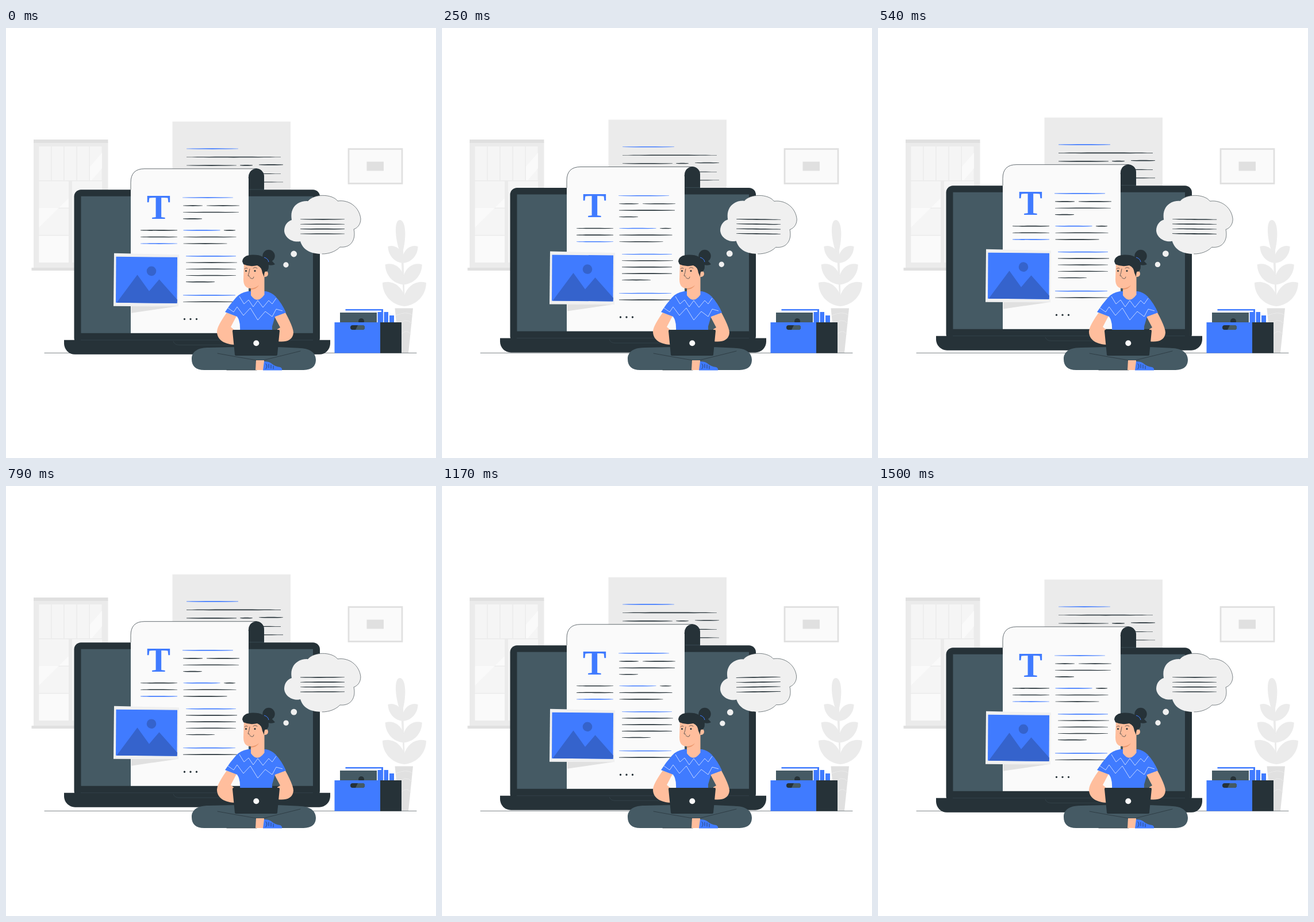
An HTML page for the animation above (1.54 s loop, 748 by 748 pixels).

```html
<!DOCTYPE html>
<html lang="en">
<head>
<meta charset="utf-8">
<title>Writing illustration</title>
<style>
  html, body { margin: 0; width: 100%; height: 100%; overflow: hidden; background: #fff; }
  svg { display: block; width: 100%; height: 100%; }
  .dark { fill: #263238; }
  .slate { fill: #455a64; }
  .blue { fill: #407bff; }
  .navy { fill: #3563cc; }
  .skin { fill: #ffbe9d; }
  .pale { fill: #ebebeb; }
  .grey { fill: #e0e0e0; }
  .paper { fill: #fafafa; }
  .cloud { fill: #f0f0f0; }
  .ink { fill: none; stroke: #263238; stroke-width: .7; stroke-linecap: round; stroke-linejoin: round; }
</style>
</head>
<body>
<svg viewBox="0 0 748 748">
  <!-- window -->
  <path class="pale" d="M48 199H177.500V418H48Z"/>
  <path class="grey" d="M48 194H177.500V200H48ZM44.500 417H180V422H44.500Z"/>
  <g id="panes"></g>
  <path class="paper" d="M57.500 347L109 296V312.500H57.500ZM57.500 361.500H109V408H57.500ZM146 241L167 217V244L149 265H146Z"/>

  <!-- wall frame -->
  <rect x="596" y="210.500" width="93" height="60" fill="#fafafa" stroke="#e0e0e0" stroke-width="2.800"/>
  <path class="grey" d="M627.500 232.500H657V248.500H627.500Z"/>

  <!-- plant -->
  <path class="pale" d="M685 334C695 334 697 361 691 386L694 484H692L687 394C677 371 674 334 685 334Z"/>
  <g id="leaves" class="pale"></g>
  <path class="grey" d="M676.500 487.500H708L700 565H684Z"/>
  <path d="M678 500Q696 492 707 499M680 518Q695 502 706 514M682 540Q695 520 704 533" fill="none" stroke="#ebebeb"/>
  <path class="ink" d="M67 565.300H714" style="stroke-width:.6"/>

  <!-- file box -->
  <path class="blue" d="M590.500 489H656V514H590.500ZM657.500 494H665V514H657.500ZM667 500H675V514H667Z"/>
  <path fill="#fff" d="M590 491.500H653V514H579V493H590Z"/>
  <path class="slate" d="M581 495H645V513H581Z"/>
  <path class="blue" d="M646.500 494H655V513H646.500Z"/>
  <circle class="dark" cx="618" cy="510" r="5"/>
  <path class="blue" d="M571.500 512H651V565.500H571.500Z"/>
  <path class="dark" d="M651 512H688V565.500H651Z"/>
  <rect class="dark" x="599" y="517" width="25" height="8" rx="4"/>
  <path class="slate" d="M612 517H620A4 4 0 0 1 620 525H608Z"/>

  <g id="laptop">
    <path class="pale" d="M289.500 163H495V300H289.500Z"/>
    <g id="backText"></g>
    <rect class="dark" x="118.500" y="281.500" width="427.500" height="270" rx="12"/>
    <path class="slate" d="M130.500 293H534V531H130.500Z"/>
    <path class="dark" d="M101 543H564V549A19 19 0 0 1 545 568H120A19 19 0 0 1 101 549Z"/>
    <path d="M130 543H534M291 545Q293 551.500 301 551.500H400" fill="none" stroke="#37474f" stroke-width=".7"/>
    <path class="dark" d="M421 292V258A14 13.500 0 0 1 449 258V281.500L440 292Z"/>
    <path d="M423 281H449" stroke="#455a64" stroke-width=".6"/>
    <path class="paper" d="M217 531V269Q217 245 241 245H436Q422 246 422 261V531Z"/>
    <path class="ink" d="M217 281V269Q217 245 241 245H436Q422 246 422 261"/>
    <text class="blue" x="265.500" y="332.500" text-anchor="middle" font-family="'Liberation Serif', serif" font-weight="700" font-size="62">T</text>
    <g id="pageText"></g>
    <path d="M310.500 506.500H333" fill="none" stroke="#263238" stroke-width="3.400" stroke-linecap="round" stroke-dasharray="0 10.500"/>
    <path class="grey" d="M218 484H300L218 496Z"/>
    <path class="cloud" d="M188 392L301 394.500L300 484.500L187 484Z"/>
    <path class="blue" d="M191.500 398L298 399L297.500 479L191 478Z"/>
    <path class="navy" d="M192.500 478L228.500 429.500L249 458L266.500 437.500L298 473L297.500 479Z"/>
    <circle class="navy" cx="253" cy="423" r="8.300"/>
  </g>

  <g id="thought">
    <path class="cloud" d="M497 334C493 312 508 300 525 301C535 288 567 288 577 301C597 298 615 312 617 332C617 342 611 348 605 350C609 367 601 383 581 381C573 389 562 393 550 393C531 393 517 387 512 371C500 374 485 366 484 353C484 343 490 336 497 334Z"/>
    <path class="ink" style="stroke-width:.6" d="M525 301C535 288 567 288 577 301C597 298 615 312 617 332C617 342 611 348 605 350C609 367 601 383 581 381C573 389 562 393 550 393"/>
    <g id="thoughtText"></g>
    <circle class="cloud" cx="500.700" cy="393" r="5.400"/>
    <circle class="cloud" cx="487" cy="412" r="4.700"/>
  </g>

  <!-- woman -->
  <path class="slate" d="M323 576C323 561 336 556 353 556L398 555H472L513 557C530 558 539 566 539 577C539 590 530 595 515 595H345C330 595 323 588 323 576Z"/>
  <path class="ink" d="M368 566Q400 572 436 578H447Q480 570 512 562M384 595H436"/>
  <path class="skin" d="M435 578H449V595H434Z"/>
  <path class="blue" d="M449 580Q457 580 461 583Q468 589 477 590Q481 592 480 595.500H447Z"/>
  <path class="ink" d="M452 584Q456 588 452 593M457 585V591M461 586V592M465 588V593"/>
  <path class="skin" d="M384 495Q367 519 367 528C367 544 382 550 398 551V526L391 520L401 501ZM467 502L486 495Q500 521 500 530C499 544 486 547 472 545V524L477 521Z"/>
  <path class="blue" d="M421 458Q406 461 400 469Q390 480 381 494L402 502Q408 510 407 527H463V519L468 502L487 495Q480 479 469 467Q462 460 452 458Z"/>
  <path d="M406 467L414 480L422 473L430 485L438 474L447 486L457 474L463 480L470 470M386 487L396 494L402 485L413 500L425 487L438 508L451 493L463 502L470 489L481 492" fill="none" stroke="#fff" stroke-width=".7"/>
  <path class="skin" d="M414 407L413 437Q413 453 426 453V465Q437 481 449.500 464V433Q456 433 456 427Q455 421 449 423L445 407Z"/>
  <path fill="#eb996e" d="M426 453Q436 452 440 447Q437 454 426 455Z"/>
  <circle class="dark" cx="457" cy="396.500" r="10.700"/>
  <path class="dark" d="M455 397L468 411Q463 414 456 412Z"/>
  <path class="dark" d="M411 406Q412 395 429 394.500Q450 394 456 408Q459 419 453 424Q449 421 449 433L446 426Q445 416 437 413Q424 416 413 411Z"/>
  <path d="M449 399Q456 401 457 407" fill="none" stroke="#407bff"/>
  <path class="ink" d="M415 419Q417 416 420 418M430 418Q433 415 437 418M424 419Q423 426 421 431L424 432M424 434Q430 439 431 433"/>
  <circle class="dark" cx="417.500" cy="422.500" r="1.500"/>
  <circle class="dark" cx="433" cy="422.500" r="1.500"/>
  <path class="dark" d="M395.500 525H474.500Q476 525 476 527L472 568Q472 570 470 570H400Q398 570 398 568L394 527Q394 525 395.500 525Z"/>
  <circle class="paper" cx="435.300" cy="548.300" r="5"/>
</svg>
<script>
const byId = id => document.getElementById(id);

function addPath(id, d, attributes) {
  byId(id).insertAdjacentHTML('beforeend', `<path d="${d}" ${attributes}/>`);
}

// A ruled line that tapers at both ends like a brush stroke
function brush(id, x, y, width, color = 'dark') {
  const bend = width * .3, flat = width * .4;
  addPath(id, `M${x} ${y - .3}c${bend} -.7 ${bend + flat} -.7 ${width} 0v.6` +
    `c${-bend} .7 ${-bend - flat} .7 ${-width} 0Z`, `class="${color}"`);
}

function paragraph(id, x, y, pitch, widths, blueRow) {
  widths.forEach((width, row) =>
    brush(id, x, y + row * pitch, width, row === blueRow ? 'blue' : 'dark'));
}

const ROW = 11.4;
paragraph('backText', 314, 210.2, 14.5, [90, 164, 87, 164, 168], 0);
brush('backText', 407, 239, 22);
brush('backText', 440, 238, 42);

brush('pageText', 307, 295.2, 88, 'blue');
paragraph('pageText', 308, 309.2, ROW, [34, 97, 33]);
brush('pageText', 349, 309.2, 57);
paragraph('pageText', 234, 352, ROW + .2, [64, 64, 64], 2);
paragraph('pageText', 308.5, 352, ROW + .2, [64, 92, 76], 0);
brush('pageText', 379, 352, 20);
paragraph('pageText', 313, 397, ROW - .2, [87, 89, 87, 87, 50], 0);
paragraph('pageText', 308, 465, ROW, [91, 94], 0);
paragraph('thoughtText', 512, 332.8, 8.4, [77, 77, 77, 77]);

for (let i = 0; i < 5; i++) addPath('panes', `M${57.5 + i * 22.1} 206h20.6v59h-20.6Z`, 'fill="#f5f5f5"');
for (let i = 0; i < 3; i++) addPath('panes', `M57.5 ${266.5 + i * 47.5}h51.5v46h-51.5Z`, 'fill="#f5f5f5"');
addPath('panes', 'M115 266.5H167V408H115Z', 'fill="#f5f5f5"');

// Pairs of leaves, wider towards the pot
for (let level = 0; level < 3; level++) {
  for (const side of [-1, 1]) {
    const size = 26 + level * 6;
    addPath('leaves', 'M0 0C.6 -.05 1 -.5 1 -1C.6 -1.12 .15 -.9 0 -.45Z',
      `transform="translate(${690.5 + level * 1.2} ${409 + level * 37.5}) scale(${side * size} ${size + 3})"`);
  }
}

const LOOP = 1540, CYCLE = 1500, LEAD = 10, LIFT = 10, SWAY = 1;
const laptop = byId('laptop'), thought = byId('thought');

// Linear swing 0 → 1 → 0 over one turn
const triangle = turn => 1 - Math.abs(1 - 2 * (turn - Math.floor(turn)));

function render() {
  const turn = (performance.now() % LOOP + LEAD) / CYCLE;
  laptop.setAttribute('transform', `translate(0 ${-LIFT * triangle(turn)})`);
  thought.setAttribute('transform', `rotate(${SWAY * (2 * triangle(turn + .25) - 1)} 549.5 354)`);
  requestAnimationFrame(render);
}
render();
</script>
</body>
</html>
```
